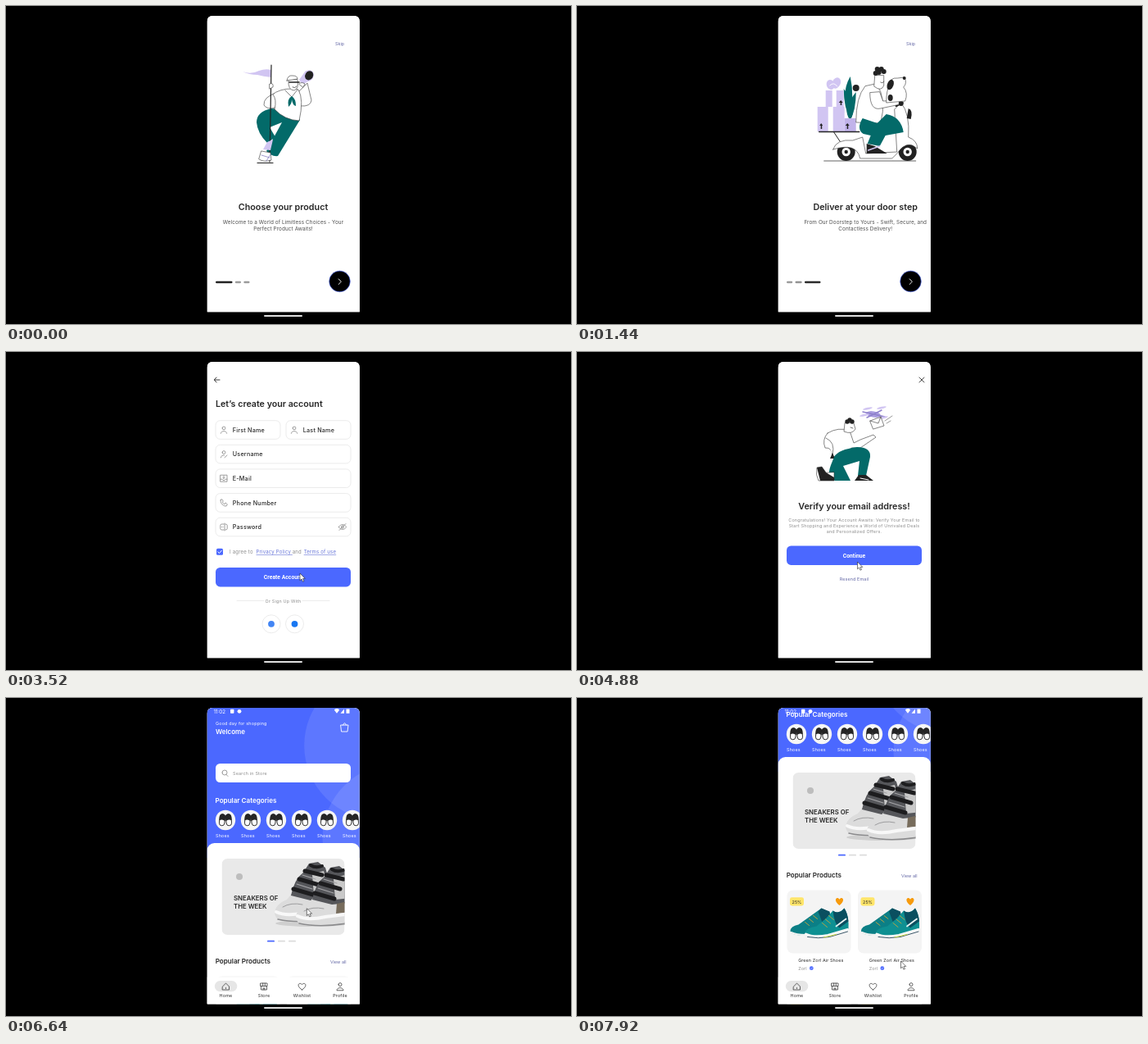
An HTML page for the animation above (8 s loop, 690 by 388 pixels).

```html
<!DOCTYPE html>
<html lang="en">
<head>
<meta charset="utf-8">
<title>Store app walkthrough</title>
<style>
html, body { margin: 0; width: 100%; height: 100%; overflow: hidden; background: #000; }
svg { display: block; width: 100%; height: 100%; }
text { font-family: Inter, 'Open Sans', sans-serif; fill: #272727; white-space: pre; }
.b { font-weight: 600; }
.n { font-weight: 500; letter-spacing: .2px; }
.m { text-anchor: middle; }
.l { letter-spacing: .11px; }
.k { letter-spacing: .2px; }
.d { fill: #4f4f4f; }
.g { fill: #8d8d8d; }
.v { fill: #6468a6; }
.w { fill: #fff; }
.r { font-family: Roboto, sans-serif; font-weight: 700; }
.u { fill: #6674d8; text-decoration: underline; }
.o { fill: none; stroke: #777; stroke-width: .7; stroke-linecap: round; stroke-linejoin: round; }
.s { fill: #fff; stroke: #333; stroke-width: .6; stroke-linejoin: round; stroke-linecap: round; }
</style>
</head>
<body>
<svg id="stage" viewBox="0 0 690 388"></svg>
<script>
const BLUE = '#4b68ff', TEAL = '#036a69', LILAC = '#d1c5f2', INK = '#222';
const LOOP = 8000, PAGE = 186.5;

const text = (x, y, size, str, cls = '') => `<text x="${x}" y="${y}" font-size="${size}" class="${cls}">${str}</text>`;
const rect = (x, y, w, h, r, fill, more = '') => `<rect x="${x}" y="${y}" width="${w}" height="${h}" rx="${r}" fill="${fill}" ${more}/>`;
const disc = (x, y, r, fill, more = '') => `<circle cx="${x}" cy="${y}" r="${r}" fill="${fill}" ${more}/>`;
const oval = (x, y, rx, ry, fill, turn = 0) => `<ellipse rx="${rx}" ry="${ry}" fill="${fill}" transform="translate(${x} ${y}) rotate(${turn})"/>`;
const shape = (d, fill) => `<path d="${d}" fill="${fill}"/>`;
const line = (d, cls = 'o') => `<path d="${d}" class="${cls}"/>`;
const stroke = (d, color, w) => `<path d="${d}" fill="none" stroke="${color}" stroke-width="${w}" stroke-linecap="round" stroke-linejoin="round"/>`;
const at = (x, y, body) => `<g transform="translate(${x} ${y})">${body}</g>`;
const lines = (x, y, step, size, cls, rows) => rows.map((row, i) => text(x, y + i * step, size, row, cls)).join('');
const sheet = rect(245.5, 11.5, PAGE, 362.5, 0, '#fff');

// Line icons drawn around 0,0
const icon = {
  user: line('M-1.9-2.1a1.9 1.9 0 1 0 3.8 0a1.9 1.9 0 1 0-3.8 0M-3.7 4.3C-3.7.6 3.7.6 3.7 4.3'),
  edit: line('M-1.9-2.1a1.9 1.9 0 1 0 3.8 0a1.9 1.9 0 1 0-3.8 0M-3.7 4.3C-3.6 1.8-1 1.2.5 1.5M1 4.2L4 1.3'),
  mail: line('M-4-4H4V4H-4ZM-4 1H-2L-1 2.3H1L2 1H4M0-3V0M-1.2-1L0 .2L1.2-1'),
  send: line('M-3.3-3.5Q-3.8-4.6-2.4-4.1L3.6-.9Q4.8 0 3.6.9L-2.4 4.1Q-3.8 4.6-3.3 3.5Z'),
  phone: line('M-3.8-3.3L-2.3-4.3L-.7-1.9L-1.7-.8Q-.8 1 .9 1.8L2 0L4.3 1.9L3.3 3.9C0 5.2-5 .2-3.8-3.3Z'),
  pass: line('M0-3.5H-2.5Q-4.2-3.5-4.2-2V2Q-4.2 3.5-2.5 3.5H0M2-3.5Q4.2-3.5 4.2-2V2Q4.2 3.5 2 3.5M1-4.5V4.5M-2.6 0H-2.4M-1 0H-.8'),
  eye: line('M-4.6 0C-2.4-3.9 2.4-3.9 4.6 0C2.4 3.9-2.4 3.9-4.6 0ZM-1.5 0a1.5 1.5 0 1 0 3 0a1.5 1.5 0 1 0-3 0M4-4L-4 4'),
};

const field = (x, y, w, kind, label, extra = '') =>
  rect(x, y - 11.3, w, 22.6, 5.5, '#fff', 'stroke="#e3e3e3" stroke-width=".7"') +
  at(x + 10, y, icon[kind]) + text(x + 20.8, y + 2.6, 7.2, label, 'n') + extra;
const hidden = y => at(411, y, icon.eye);
const button = (y, label) => rect(256, y - 11.7, 165, 23.4, 5.4, BLUE) + text(338.5, y + 2.4, 6.8, label, 'r w m');
const check = (x, y) => rect(x - 4, y - 4, 8, 8, 1.6, BLUE) + stroke(`M${x - 2.2} ${y}l1.6 1.7l3-3.3`, '#fff', 1);
const social = (y, label) => stroke(`M282 ${y}H315M362 ${y}H395`, '#e0e0e0', .6) +
  text(338.5, y + 2, 5.4, label, 'k g m') +
  [[324, '#4285f4'], [352.5, '#1877f2']].map(([x, c]) =>
    disc(x, y + 28.3, 11, '#fff', 'stroke="#e2e2e2" stroke-width=".7"') + disc(x, y + 28.3, 3.9, c)).join('');

const sailor = () =>
  shape('M289 80Q299 84 309 79Q317 76 324 78V87Q314 86 307 84Q297 84 289 80Z', LILAC) +
  line('M330 106Q314 111 315 121Q319 127 329 124', 's') +
  line('M358 104L368 94L373 115Q372 123 360 122Z', 's') +
  shape('M324 125Q306 129 306 142Q307 155 319 167L329 160L322 148L337 142L318 177Q324 184 332 183L359 139L352 128Z', TEAL) +
  line('M330 105Q342 99 357 102Q364 114 358 140Q340 139 328 126Q331 114 326 108Z', 's') +
  line('M341 103L349 111L356 102', 's') +
  shape('M349 110Q343 113 345 123Q349 120 349 114Q350 121 354 122Q354 113 349 110Z', TEAL) +
  line('M345 90Q344 103 352 103Q358 101 356 90Z', 's') + line('M343 91Q344 84 350 85Q356 85 356 89Q350 90 343 91Z', 's') +
  stroke('M346 93H358', INK, 1.6) + stroke('M350 99Q353 101 355 98', INK, .7) +
  shape('M358 90L366 79Q374 82 374 89L362 96Z', LILAC) + oval(369.600, 85, 6, 7, LILAC, 30) + oval(370.200, 84.800, 4.800, 5.800, INK, 30) +
  line('M358 95Q361 92 365 95L363 99Z', 's') +
  stroke('M324 72L322 190', INK, 1.2) + line('M322 95Q327 93 326 99L322 101Z', 's') +
  shape('M319 166L326 163L323 176L314 175Z', LILAC) +
  line('M312 177L323 179L324 188Q315 191 309 187Z', 's') + stroke('M312 182L322 185M323 181L318 189', '#8a7fc2', .8) +
  stroke('M307 191.5H326', INK, 1.2);

const payer = () =>
  rect(306, 82, 42, 92, 6, LILAC) + rect(310, 90, 34, 74, 2, '#fff') +
  rect(314, 98, 26, 16, 2, TEAL) + stroke('M314 122H338M314 130H332', '#aaa', 1.2) +
  line('M349 110Q360 103 370 111L372 141H347Z', 's') +
  line('M352 92Q352 106 360 105Q367 102 365 91Z', 's') +
  shape('M351 94Q350 82 360 84Q368 85 366 93L360 90Z', INK) +
  line('M350 113L335 125L339 130L354 123Z', 's') +
  shape('M347 140H372L370 187H362L359 152L354 187H346Z', TEAL) +
  shape('M345 186H354V190H341ZM362 186H371V190H358Z', INK) + stroke('M301 190.5H378', INK, .8);

const wheel = x => disc(x, 178, 11, INK) + disc(x, 178, 5.2, '#fff') + disc(x, 178, 2.2, INK);
const rider = () =>
  [[334, 86, -4], [326, 101, 9], [341, 105, -9]].map(([x, y, b]) =>
    shape(`M${x} ${y}Q${x + b + 9} ${y + 22} 334 139Q${x + b - 9} ${y + 22} ${x} ${y}Z`, TEAL)).join('') +
  disc(341, 100, 4, INK) +
  oval(310, 96, 5, 6, LILAC, -20) + oval(317, 94, 5, 7, LILAC, 25) + stroke('M309 97Q314 92 318 98', '#fff', .9) +
  rect(304, 103, 22, 20, 0, LILAC) + rect(294, 123, 33, 30, 0, LILAC) + rect(327, 137, 14, 16, 0, '#c1b3ea') +
  rect(312, 103, 5, 20, 0, '#fff') + rect(307, 123, 6, 30, 0, '#fff') +
  shape('M298 150V146H296.5L298.5 143L300.5 146H299.5V150ZM330 150V146H328L330.5 143L333 146H331.5V150ZM322 121V118H320L322.5 115L325 118H323.5V121Z', INK) +
  stroke('M296 153.5H345', INK, 1.5) + stroke('M314 154L322 166', INK, 1) +
  wheel(329) + wheel(404) +
  line('M313 175Q317 162 337 164L349 160L353 180L391 178L388 126L396 118Q407 131 405 160Q416 164 416 174Q403 162 391 180L385 186H346Q342 166 313 175Z', 's') +
  shape('M405 125Q411 127 408 138L403 137Z', INK) + stroke('M390 122L398 118', INK, 2) +
  line('M352 98Q341 111 341 142L371 143Q379 113 366 95Z', 's') +
  shape('M349 137Q341 150 350 156L359 158L355 168L370 171L377 158L399 154Q396 135 378 132L367 143Z', TEAL) +
  line('M358 106Q358 128 371 125L395 120L393 115L374 116L370 105Z', 's') + disc(396, 119, 3, INK) +
  line('M364 85L363 98Q372 105 375 97V85Z', 's') +
  [[365, 82], [367, 77], [372, 77], [375, 80], [369, 81]].map(([x, y]) => disc(x, y, 3, INK)).join('') +
  stroke('M371 93Q374 95 375 92', INK, .6) +
  line('M382 96Q382 87 392 88L400 87Q404 94 399 99Q405 106 401 116L378 118Q378 103 382 96Z', 's') +
  oval(383, 96, 3.8, 6.5, INK, 20) + disc(400, 88, 2, INK) + oval(383, 112, 3, 4, INK) +
  shape('M354 168L364 171L379 180H354Z', INK) + stroke('M356 176L370 171', LILAC, 1.5) + stroke('M302 189H414', INK, .7);

const kneeler = () =>
  line('M306 99Q319 91 333 96L338 111L346 107L362 101L365 104L346 117L335 117L334 125L312 128Q312 116 303 117Q299 107 306 99Z', 's') +
  line('M304 105Q316 110 312 125', 's') +
  shape('M312 123L315 130L309 130Z', INK) +
  shape('M314 128Q319 119 342 116Q359 116 358 128L353 151H343L345 133L325 139L334 157H315Q304 154 310 138Z', TEAL) +
  line('M314 147V157H295Q291 150 293 141L299 140L304 147Z', 's') + shape('M293 141L299 140L304 147L314 153V157H297Z', INK) +
  shape('M344 150H353L362 157H339Z', INK) + stroke('M346 154L356 156', '#fff', 1) +
  line('M327 87L326 97Q336 101 340 94L338 87Z', 's') +
  [[330, 85], [333, 83], [336, 85]].map(([x, y]) => disc(x, y, 2.7, INK)).join('') +
  stroke('M334 92L337 93', INK, .6) +
  oval(362, 76, 9, 3.6, '#a99ce0', 10) + stroke('M349 73L376 79M354 80L372 71', '#8f82cc', 1.5) +
  [[351, 77], [355, 69], [372, 68], [374, 80]].map(([x, y]) => oval(x, y, 6, 1.3, LILAC, -12)).join('') +
  line('M358 84L371 79L375 90L362 94ZM358 84L368 87L371 79', 's') +
  stroke('M376 84L385 78M378 87L383 84', '#555', .6);

const page = (i, art, title, rows) => at(i * PAGE, 0, art +
  text(338.5, 249.2, 10.75, title, 'b m') + lines(338.5, 265.6, 8.6, 6.33, 'l d m', rows));

const onboarding = () => sheet + `<g id="pages">` +
  page(0, sailor(), 'Choose your product', ['Welcome to a World of Limitless Choices - Your', 'Perfect Product Awaits!']) +
  page(1, payer(), 'Select payment method', ['For Seamless Transactions, Choose Your Payment', 'Path - Your Convenience, Our Priority!']) +
  page(2, at(-14, 0, rider()), 'Deliver at your door step', ['From Our Doorstep to Yours - Swift, Secure, and', 'Contactless Delivery!']) +
  '</g>' + text(402, 47.8, 5.4, 'Skip', 'v') +
  [0, 1, 2].map(i => rect(256, 335.8, 7.2, 2.4, 1.2, '#999', `id="dot${i}"`)).join('') +
  disc(407.5, 336, 12.8, '#000', `stroke="${BLUE}" stroke-width=".6"`) + stroke('M406.2 333L409.3 336.3L406.2 339.6', '#fff', .9);

const login = () => sheet + rect(273, 55, 28, 28, 0, '#2e2d2b') +
  text(256, 110.5, 10.8, 'Welcome back,', 'b') +
  lines(256, 123.3, 8.6, 6.33, 'l d', ['Discover Limitless Choices and Unmatched', 'Convenience.']) +
  field(256, 159.3, 165, 'send', 'E-Mail') + field(256, 189, 165, 'pass', 'Password', hidden(189)) +
  check(266, 214) + text(298, 216.3, 6.33, 'Remember Me', 'l d') + text(369.8, 216, 5.4, 'Forget Password?', 'v') +
  button(250, 'Sign In') + rect(256, 269, 165, 23.4, 5.4, '#fff', 'stroke="#dedede" stroke-width=".7"') +
  text(338.5, 283.2, 6.8, 'Create Account', 'r m') + social(309.7, 'Or Sign In With');

const signup = () => sheet + stroke('M261 34H254.5M257 31L254.3 34L257 37', INK, .9) +
  text(256, 66.7, 10.7, 'Let’s create your account', 'b') +
  field(256, 95, 79, 'user', 'First Name') + field(342, 95, 79, 'user', 'Last Name') +
  field(256, 124.6, 165, 'edit', 'Username') + field(256, 154.2, 165, 'mail', 'E-Mail') +
  field(256, 183.9, 165, 'phone', 'Phone Number') + field(256, 213.5, 165, 'pass', 'Password', hidden(213.5)) +
  check(261, 243.8) + text(273, 246, 6, 'I agree to', 'k g') + text(305.5, 246, 6, 'Privacy Policy ', 'k u') +
  text(349.7, 246, 6, 'and', 'k g') + text(363.7, 246, 6, 'Terms of use', 'k u') +
  button(274.7, 'Create Account') + social(303.5, 'Or Sign Up With');

const verify = () => sheet + stroke('M418 31L424 37M424 31L418 37', INK, .8) + kneeler() +
  text(338.5, 192, 10.8, 'Verify your email address!', 'b m') +
  lines(338.5, 207.3, 6.8, 5.4, 'k g m', ['Congratulations! Your Account Awaits: Verify Your Email to', 'Start Shopping and Experience a World of Unrivaled Deals', 'and Personalized Offers.']) +
  button(248.2, 'Continue') + text(338.5, 279.2, 5.4, 'Resend Email', 'l v m');

const success = () => sheet + disc(338.5, 112, 38, LILAC) + disc(338.5, 112, 27, TEAL) + stroke('M326 112L335 121L351 104', '#fff', 4) +
  lines(338.5, 180, 13, 10.8, 'b m', ['Your account successfully', 'created!']) +
  lines(338.5, 207.3, 6.8, 5.4, 'k g m', ['Welcome to Your Ultimate Shopping Destination: Your', 'Account is Created, Unleash the Joy of Seamless Online', 'Shopping!']) +
  button(248.2, 'Continue');

const slipper = (x, turn) => `<g transform="translate(${x} 0) rotate(${turn})">` +
  rect(-3.2, -7.2, 6.4, 14, 3.2, '#fff', 'stroke="#252525" stroke-width=".9"') +
  shape('M-3.6 1V-4C-3.6-9 3.6-9 3.6-4V1Q0-2 -3.6 1Z', '#252525') + '</g>';
const category = i => at(268 + i * 31, 44, disc(0, 0, 12.2, '#f6f6f6') + slipper(-4, 6) + slipper(4, -6) + text(-12, 21.2, 5.4, 'Shoes', 'k w'));

// A pair of running shoes, toes to the left
const trainers =
  shape('M4 50Q4 44 14 42L28 32L42 22L52 27L55 50L24 55Q6 56 4 50Z', '#0b7f86') +
  shape('M38 26L42 22L52 26L54 40L44 42Z', '#0a4f60') + stroke('M5 51.500Q14 56 34 54', '#eef2f1', 2) +
  shape('M22 52Q23 46 36 44L48 34L56 25Q63 30 70 22Q76 32 75 48L52 56Q25 60 22 52Z', '#0e9092') +
  shape('M56 25Q63 30 70 22Q74 28 75 38L64 46Q58 42 56 25Z', '#0a4f60') +
  stroke('M23 53.500Q32 58 50 55L74 48', '#f7f9f8', 3) + stroke('M25 57Q38 59.500 52 57L74 50.500', '#27465a', .9) +
  stroke('M45 57.500L60 54', '#c9d94a', 1.2) + stroke('M60 44L72 35', '#e8f3f2', 1.8) +
  [0, 1, 2].map(i => stroke(`M${43 + i * 4} ${40 - i * 4.5}l6 5M${22 + i * 5} ${39 - i * 4}l5 4`, '#cba43c', .9)).join('');
const product = (x, y) => at(x, y,
  rect(0, 0, 78, 77, 7, '#f4f4f4') + trainers +
  rect(3.5, 8.8, 17, 10.2, 2.4, '#ffe56a') + text(12, 16.1, 5.4, '25%', 'm') +
  shape('M64 18.5C57 13 59.5 8.8 62 9.5Q63.5 10 64 11.3Q64.5 10 66 9.5C68.5 8.8 71 13 64 18.5Z', '#f79a0b') +
  text(13.7, 87, 5.4, 'Green Zorl Air Shoes', 'l') + text(13.7, 97, 5.4, 'Zorl', 'l g') +
  disc(29.8, 95.2, 2.4, BLUE) + stroke('M28.7 95.2l.8.8l1.5-1.6', '#fff', .5) +
  text(3.3, 118.3, 7.3, '$35', 'b') +
  shape('M61.5 123V112Q61.5 107 66.5 107H78V116Q78 123 71 123Z', INK) + stroke('M69.7 112.3V118.3M66.7 115.3H72.7', '#fff', .9));

const sneaker =
  shape('M0 62Q2 52 15 47L24 36L46 38L70 36V70Q38 78 9 73Q0 71 0 62Z', '#dcdcdc') +
  shape('M20 42Q24 22 35 14L42 3L53 1L62 8L70 36L66 46L44 48Z', '#55565a') +
  shape('M46 16L60 12L67 40L48 42Z', '#c9c9c9') +
  stroke('M37 12L58 17M30 22L54 29M23 34L47 41', '#1d1d1f', 5) + stroke('M44 5Q50 9 58 6', '#1d1d1f', 4) +
  stroke('M34 17L50 22M27 28L46 34', '#a5a5a8', 1.2) +
  shape('M50 47L68 43V57L49 59Z', '#776c5c') +
  stroke('M2 62Q14 68 36 63L69 59', '#f8f8f8', 4) + stroke('M4 71Q30 77 68 70', '#8b8b8d', 1.6) + stroke('M10 56Q20 50 34 53', '#9c9c9e', 1);
const banner = `<g clip-path="url(#card)">` + rect(263.5, 91, 150, 93, 0, '#e9e9e9') + oval(375, 170, 46, 4, '#cfcfcf') +
  at(328, 94, sneaker) + at(354, 99, sneaker) + '</g>' + disc(285, 113, 4, '#bdbdbd') +
  lines(278, 142, 10, 7.8, 'b', ['SNEAKERS OF', 'THE WEEK']);

const tabs = [
  ['Home', 'M-4 0L0-4L4 0V4H-4ZM0 1.5V2.5'],
  ['Store', 'M-4-4H4V-.5H-4ZM-3.5-.5V4H3.5V-.5M-1.3-4V-.5M1.3-4V-.5M-1 4V2H1V4'],
  ['Wishlist', 'M0 4C-8-1-3.5-6 0-2.5C3.5-6 8-1 0 4Z'],
  ['Profile', 'M-2-2.4a2 2 0 1 0 4 0a2 2 0 1 0-4 0M-4 4.4C-4 .6 4 .6 4 4.4Z'],
];
const nav = rect(245.5, 340.5, PAGE, 33.5, 0, '#fff') + rect(254.8, 345, 27.5, 13.3, 6.6, '#e6e6e6') +
  tabs.map(([name, d], i) => at(268.5 + i * 46.5, 352, stroke(d, '#333', .75) + text(0, 13.2, 5.4, name, 'k m'))).join('');
const status = text(253.5, 18.6, 6.2, '11:02', 'w') + rect(274, 13.8, 4.4, 5, .8, '#fff') + disc(285, 16.3, 2.4, '#fff') +
  shape('M400.8 14.4Q404 11.8 407.2 14.4L404 18.8ZM408.5 18.8L413 13.5V18.8ZM415.5 13.5H419.5V18.8H415.5Z', '#fff');

const home = () => sheet + `<g id="scroll">` +
  rect(245.5, -100, PAGE, 190, 0, BLUE) + disc(454.7, -47, 90.5, '#fff', 'opacity=".1"') + disc(477, 66, 90.5, '#fff', 'opacity=".1"') +
  text(256, -72, 5.4, 'Good day for shopping', 'k w') + text(256, -61, 8, 'Welcome', 'b w') +
  stroke('M409 -72H418L417 -64H410ZM411.5 -72Q413.5 -77 415.5 -72', '#fff', .9) +
  rect(256, -25, 165, 23, 5.4, '#fff') + at(267, -13.5, line('M-3-.5a3 3 0 1 0 6 0a3 3 0 1 0-6 0M2 2L4 4')) + text(277, -11.3, 5.4, 'Search in Store', 'k g') +
  text(255.5, 22.8, 8.1, 'Popular Categories', 'b w') + [0, 1, 2, 3, 4, 5].map(category).join('') +
  rect(245.5, 72, PAGE, 560, 9, '#fff') + banner +
  [BLUE, '#dcdcdc', '#dcdcdc'].map((c, i) => rect(319 + i * 13, 190.8, 9, 1.8, .9, c)).join('') +
  text(255.7, 219.3, 8.1, 'Popular Products', 'b') + text(396, 218.7, 5.4, 'View all', 'v') +
  [0, 1, 2, 3].map(i => product(i % 2 ? 343 : 256.5, i < 2 ? 234.5 : 364.5)).join('') +
  '</g>' + nav + status;

// Each screen with the time it starts to come in
const screens = [[onboarding, -999], [login, 1940], [signup, 3380], [verify, 4330], [success, 5080], [login, 5900], [home, 6250]];
const FADE = 120;

const stage = document.getElementById('stage');
stage.innerHTML = `<defs>
  <clipPath id="phone"><path d="M245.6 373.3V19Q245.6 12 252.6 12H424.8Q431.8 12 431.8 19V373.3Z"/></clipPath>
  <clipPath id="card">${rect(263.5, 91, 150, 93, 7, '#000')}</clipPath></defs>` +
  rect(0, 0, 690, 388, 0, '#000') +
  `<g clip-path="url(#phone)">${sheet}${screens.map(([draw], i) => `<g id="screen${i}">${draw()}</g>`).join('')}</g>` +
  rect(315, 377.2, 47, 1.7, .8, '#fff') +
  `<path id="cursor" d="M0 0V8.8L2 7L3.4 10.2L5 9.5L3.6 6.4H6.3Z" fill="#fff" stroke="#222" stroke-width=".6"/>`;

const el = id => document.getElementById(id);
const clamp = v => Math.min(1, Math.max(0, v));
const easeOut = p => 1 - (1 - p) ** 3;
const smooth = p => p * p * (3 - 2 * p);

// Eased value of column c between keyed rows [time, ...values]
function track(keys, t, c = 1) {
  const i = keys.findIndex(k => k[0] > t);
  if (i < 0) return keys[keys.length - 1][c];
  if (!i) return keys[0][c];
  const a = keys[i - 1], b = keys[i];
  return a[c] + (b[c] - a[c]) * smooth((t - a[0]) / (b[0] - a[0]));
}

const pointer = [
  [2700, 378, 56], [2940, 303, 190], [3140, 345, 284], [3280, 359, 270], [4200, 359, 270], [4880, 342.5, 256],
  [5040, 342.5, 256], [5300, 340, 250], [6080, 333.5, 244.5], [6260, 333.5, 244.5], [6860, 382, 262],
  [7280, 380, 135], [7500, 384, 110], [7580, 388, 118], [7920, 395.5, 321],
];
const scroll = [[6860, 0], [7280, 122], [7500, 200], [7580, 200], [7920, 105]];

function draw(t) {
  const now = screens.filter(s => s[1] <= t).length - 1;
  const p = clamp((t - screens[now][1]) / FADE);
  screens.forEach((s, i) => {
    const g = el('screen' + i), on = i === now, k = on ? .9 + .1 * easeOut(p) : 1;
    g.style.display = on || (i === now - 1 && p < 1) ? '' : 'none';
    g.setAttribute('opacity', on ? p : 1);
    g.setAttribute('transform', `translate(${338.75 * (1 - k)} ${192.75 * (1 - k)}) scale(${k})`);
  });

  const pos = easeOut(clamp((t - 80) / 690)) + easeOut(clamp((t - 1040) / 690));
  el('pages').setAttribute('transform', `translate(${-pos * PAGE} 0)`);
  let x = 256;
  for (let i = 0; i < 3; i++) {
    const near = clamp(1 - Math.abs(pos - i)), w = 7.2 + 13.3 * near, dot = el('dot' + i), tone = 155 - 121 * near;
    dot.setAttribute('x', x);
    dot.setAttribute('width', w);
    dot.setAttribute('fill', `rgb(${tone},${tone},${tone})`);
    x += w + 3.3;
  }

  el('scroll').setAttribute('transform', `translate(0 ${105 - track(scroll, t)})`);
  el('cursor').style.display = t < 2700 ? 'none' : '';
  el('cursor').setAttribute('transform', `translate(${track(pointer, t)} ${track(pointer, t, 2)})`);
}

const start = performance.now();
function tick() {
  draw((performance.now() - start) % LOOP);
  requestAnimationFrame(tick);
}
tick();
</script>
</body>
</html>
```
